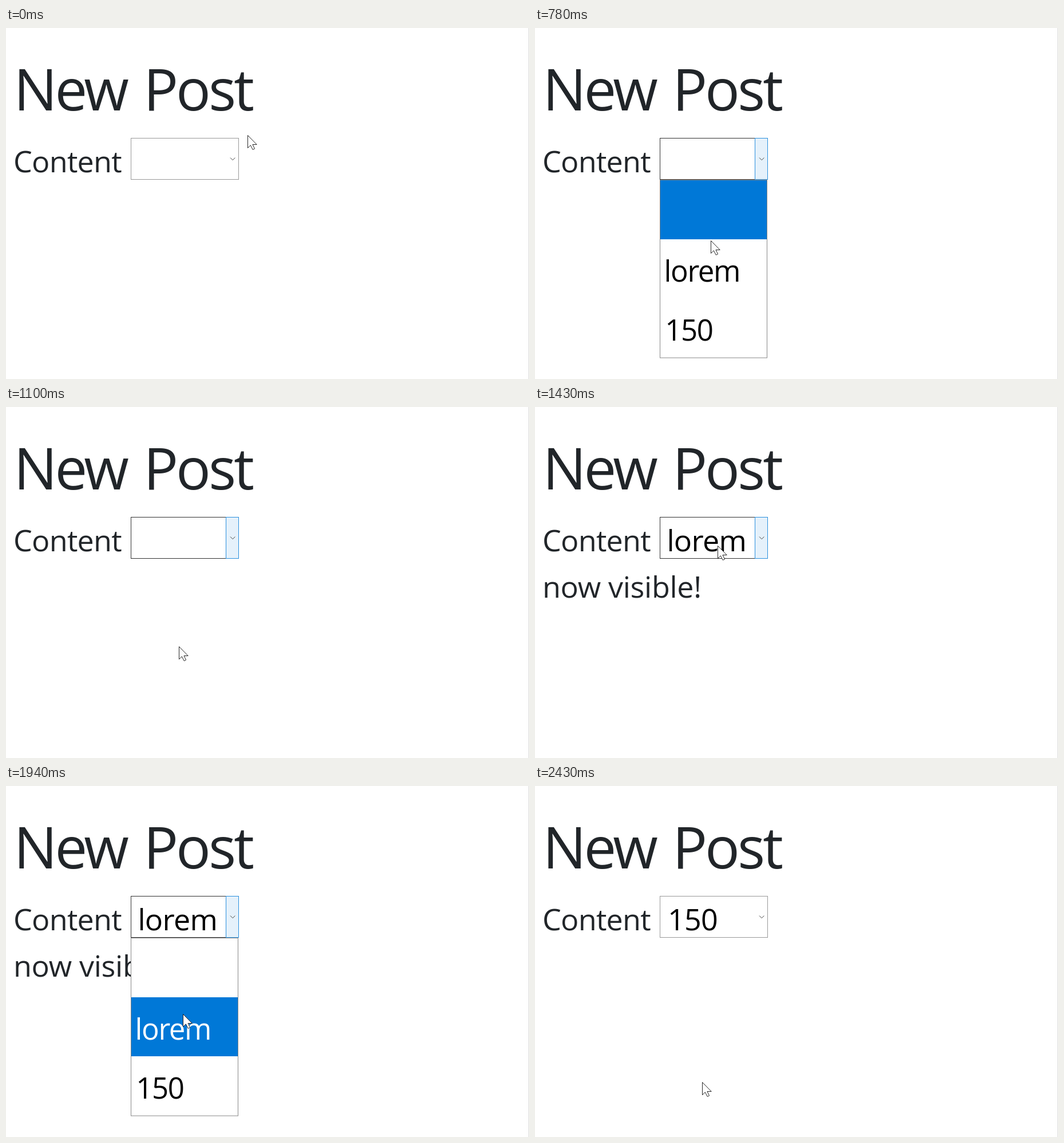
Recreate the animation shown at these times as an HTML page. Size 914 by 613 pixels, loop 3260 ms.

```html
<!DOCTYPE html>
<html lang="en">
<head>
<meta charset="utf-8">
<title>New Post</title>
<style>
html, body { margin: 0; width: 100%; height: 100%; overflow: hidden; background: #fff; }
svg { display: block; width: 914px; height: 613px; }
text { font-family: "Open Sans", "Noto Sans", sans-serif; font-size: 52px; fill: #212529; }
.title { font-size: 101px; letter-spacing: -.04em; word-spacing: .073em; }
.label { letter-spacing: -.014em; }
.note { letter-spacing: -.006em; }
.value { fill: #000; letter-spacing: -.013em; }
.option { font-size: 51px; fill: #000; letter-spacing: -.028em; }

.note, .value, .hover, .menu, .highlight, .option, .cursor {
  animation: 3260ms step-end infinite;
}
.note { animation-name: note; }
.hover { animation-name: hover; }
.menu { animation-name: menu; }
.highlight { animation-name: highlight; }
.value.word { animation-name: note; }
.value.number { animation-name: number; }
.option.word { animation-name: word-option; }
.option.number { animation-name: number-option; }
.cursor { animation-name: cursor; }

@keyframes note {
  0%, 74.53%, 100% { opacity: 0; }
  36.5% { opacity: 1; }
}
@keyframes number {
  0%, 100% { opacity: 0; }
  74.53% { opacity: 1; }
}
@keyframes hover {
  0%, 36.5%, 74.53%, 100% { opacity: 0; }
  8.89%, 43.86% { opacity: 1; }
}
@keyframes menu {
  0%, 33.74%, 72.08%, 100% { opacity: 0; }
  13.8%, 51.53% { opacity: 1; }
}
@keyframes highlight {
  0%, 100% { transform: translateY(0); }
  26.38% { transform: translateY(103px); }
  61.96% { transform: translateY(206px); }
}
@keyframes word-option {
  0%, 61.96%, 100% { fill: #000; }
  26.38% { fill: #fff; }
}
@keyframes number-option {
  0%, 100% { fill: #000; }
  61.96% { fill: #fff; }
}
@keyframes cursor {
  0%, 100% { transform: translate(422px, 187px); }
  6.44% { transform: translate(408px, 196px); }
  8.89% { transform: translate(354px, 221px); }
  11.34% { transform: translate(320px, 235px); }
  13.8% { transform: translate(316px, 238px); }
  21.16% { transform: translate(313px, 296px); }
  23.92% { transform: translate(307px, 371px); }
  26.38% { transform: translate(303px, 408px); }
  28.83% { transform: translate(302px, 418px); }
  41.41% { transform: translate(309px, 336px); }
  43.86% { transform: translate(319px, 242px); }
  46.31% { transform: translate(322px, 233px); }
  49.07% { transform: translate(322px, 232px); }
  59.5% { transform: translate(309px, 398px); }
  61.96% { transform: translate(292px, 518px); }
  66.87% { transform: translate(292px, 517px); }
}
</style>
</head>
<body>
<svg viewBox="0 0 914 613">
  <path d="M913.5 0V613" stroke="#dcdcdc"/>
  <text class="title" x="13.5" y="144">New Post</text>
  <text class="label" x="13" y="251.5">Content</text>
  <text class="note" x="13" y="332.5">now visible!</text>

  <!-- Select box -->
  <rect x="218.5" y="192.5" width="188" height="72" fill="#fff" stroke="#999"/>
  <g class="hover">
    <rect x="218.5" y="192.5" width="188" height="72" fill="#fff" stroke="#333"/>
    <rect x="384.5" y="192.5" width="22" height="72" fill="#e5f1fb" stroke="#2a8fdd"/>
  </g>
  <path d="M392 226.5L396.2 230.7L400.4 226.5" fill="none" stroke="#444"/>
  <text class="value word" x="230.4" y="251.5">lorem</text>
  <text class="value number" x="232" y="251.5">150</text>

  <!-- Option list -->
  <g class="menu">
    <rect x="218.5" y="265.5" width="187" height="310.5" fill="#fff" stroke="#888"/>
    <rect class="highlight" x="219" y="266" width="186" height="103" fill="#0078d7"/>
    <text class="option word" x="225.6" y="443">lorem</text>
    <text class="option number" x="227.3" y="546">150</text>
  </g>

  <path class="cursor" d="M.5 .5V22.5L5.4 17.8L9.2 25.4L12.6 23.8L9 16.5H16.2Z" fill="#fff" stroke="#111" stroke-width=".9"/>
</svg>
</body>
</html>
```
